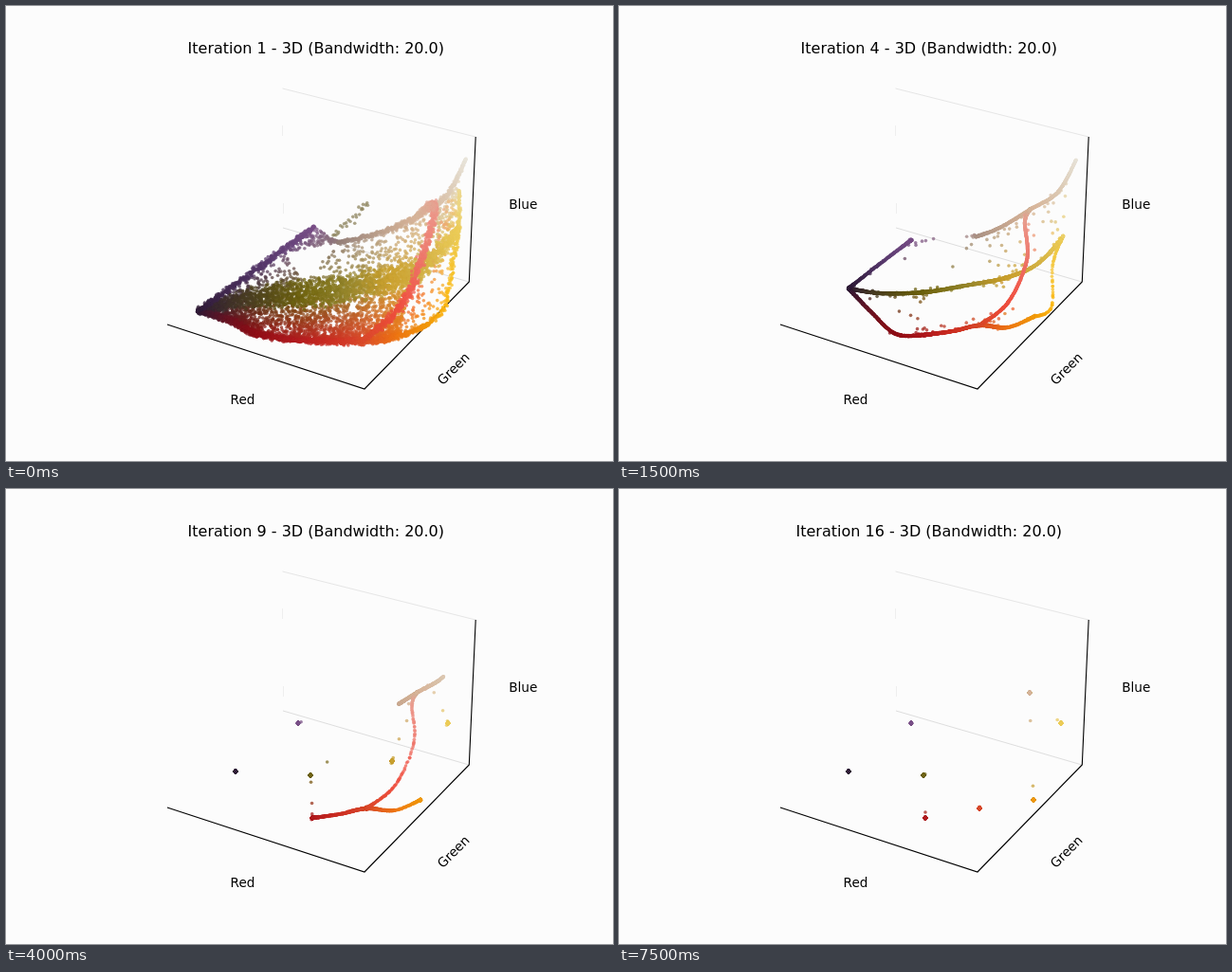
An HTML page with a canvas for the animation above (8000 ms loop, 640x480 px).

```html
<!DOCTYPE html>
<html>
<head>
<meta charset="utf-8">
<title>Mean shift in colour space</title>
<style>
html, body { margin: 0; width: 100%; height: 100%; overflow: hidden; background: #fcfcfc; }
canvas { display: block; }
</style>
</head>
<body>
<canvas id="stage" width="640" height="480"></canvas>
<script>
const ctx = document.getElementById('stage').getContext('2d');
const STEP = 500, STEPS = 16;

let seed = 1;
function rand() {
  seed = (seed * 1664525 + 1013904223) % 4294967296;
  return seed / 4294967296;
}
const mix = (a, b, t) => a + (b - a) * t;
const mixAll = (a, b, t) => a.map((v, i) => mix(v, b[i], t));
const clamp = v => Math.max(0, Math.min(1, v));

// A knot moves from its first place to its settled place; modes attract dots.
function knot(color, from, to = from, mode = false) {
  const n = parseInt(color.slice(1), 16);
  return { rgb: [n >> 16, n >> 8 & 255, n & 255], from, to, mode };
}
const mode = (color, from, to) => knot(color, from, to, true);

const dark = mode('#301c38', [202, 322], [242, 298]);
const purple = mode('#7a5088', [325, 233], [308, 247]);
const olive = mode('#706412', [315, 304], [321, 302]);
const gold = mode('#c8a030', [405, 288], [407, 287]);
const yellow = mode('#eccc58', [477, 236], [466, 247]);
const red = mode('#b01c20', [305, 353], [323, 347]);
const coral = mode('#d84a2a', [375, 354], [380, 337]);
const orange = mode('#f0980c', [445, 336], [437, 328]);
const tan = mode('#d6b49a', [433, 222], [433, 215]);
const goldStart = gold.to;

// Dots along a curve; "end" is the iteration by which all have reached a mode.
function strand(n, spread, end, ...knots) {
  const last = knots.length - 1;
  const modes = knots.flatMap((k, i) => k.mode ? [i / last] : []);
  return { n, spread, end, knots, modes };
}

const purpleArm = strand(420, 4, 5.3, purple, knot('#56386a', [268, 275], [275, 272]), dark);
const oliveBand = strand(1900, 17, 7.5, dark, knot('#4c4020', [262, 307], [275, 303]), olive,
  knot('#94842a', [362, 297], [365, 295]), gold, knot('#d2b044', [440, 276], [440, 273]), yellow);
const tanArm = strand(450, 3, 12, knot('#94807a', [350, 250], [355, 250]), knot('#bca08c', [395, 239], [397, 236]),
  tan, knot('#dcc8b2', [465, 199], [463, 196]), knot('#e8e4da', [485, 161], [484, 158]));
const darkRim = strand(500, 4, 5.5, dark, knot('#6a1422', [236, 332], [266, 323]),
  knot('#8e1018', [264, 346], [292, 346]), red);
const brightRim = strand(550, 4, 11, red, knot('#cc3024', [345, 354], [352, 343]), coral,
  knot('#ec7414', [412, 349], [410, 339]), orange);
const pinkArm = strand(700, 7, 9.5, coral, knot('#ee5040', [415, 318], [410, 313]),
  knot('#ee7468', [438, 268], [430, 268]), knot('#ea9a8c', [452, 212], [428, 228]), tan);
const column = strand(190, 4, 4.6, orange, knot('#fab410', [463, 316], [456, 318]),
  knot('#f4c434', [471, 270], [457, 275]), yellow, knot('#ecd890', [478, 195], [473, 238]));
const greys = strand(26, 5, 3, knot('#8f8560', [345, 242], tan.to), knot('#8f8560', [382, 209], tan.to));

const strands = [greys, column, tanArm, oliveBand, darkRim, brightRim, pinkArm, purpleArm];

// Dots strewn between stretches of two strands; they fall to the nearer one.
const sheets = [
  { n: 140, a: purpleArm, ua: [0, .35], b: tanArm, ub: [0, .1], bias: 1, speed: 3 },
  { n: 520, a: oliveBand, ua: [.3, 1], b: tanArm, ub: [0, .9], bias: 1.2, speed: 3 },
  { n: 300, a: purpleArm, ua: [.3, 1], b: oliveBand, ub: [.35, 0], bias: 1, speed: 20 },
  { n: 200, a: pinkArm, ua: [0, .8], b: column, ub: [0, 1], bias: 1, speed: 5 },
  { n: 1200, a: darkRim, ua: [0, 1], b: oliveBand, ub: [0, .35], bias: 2.2, speed: 20 },
  { n: 1600, a: brightRim, ua: [0, .75], b: oliveBand, ub: [.35, .8], bias: 2.2, speed: 20 }
];

// Between two modes dots gather at the nearer; free ends draw in.
function flow(u, modes, q) {
  if (!modes.length) return u;
  const m = modes.reduce((a, b) => Math.abs(b - u) < Math.abs(a - u) ? b : a);
  const d = u - m, next = modes[modes.indexOf(m) + Math.sign(d)];
  if (next === undefined) return m + d * (d < 0 ? 1 - q : 1 - q * q);
  const half = (next - m) / 2;
  return m + half * (d / half) ** (1 + .6 * q / (1 - q));
}

// Catmull-Rom through points, u in 0..1
function along(points, u) {
  const last = points.length - 1, i = Math.min(last - 1, Math.floor(u * last)), t = u * last - i;
  const [a, b, c, d] = [-1, 0, 1, 2].map(o => points[Math.max(0, Math.min(last, i + o))]);
  return b.map((v, k) => v + .5 * t * (c[k] - a[k] + t * (2 * a[k] - 5 * v + 4 * c[k] - d[k] +
    t * (3 * (v - c[k]) + d[k] - a[k]))));
}

// [x, y, r, g, b] of the dot that began at u
function place(s, u, it) {
  return along(s.points, flow(u, s.modes, clamp((it - 1) / (s.end - 1))));
}

function dot([x, y, ...rgb], spread) {
  const jitter = () => (rand() + rand() - 1) * spread;
  ctx.fillStyle = `rgb(${rgb.map(Math.round)})`;
  ctx.beginPath();
  ctx.arc(x + jitter() * .6, y + jitter(), 1.8, 0, 7);
  ctx.fill();
}

function drawStrand(s, it) {
  for (let i = 0; i < s.n; i++) {
    const u = clamp((i + rand()) / s.n);
    const lag = rand() ** (8 * (it - 1) ** 2);
    dot(place(s, u, it), .7 + s.spread * Math.sqrt(Math.sin(Math.PI * u)) * lag);
  }
}

function drawSheet({ n, a, ua, b, ub, bias, speed }, it) {
  const power = 1 + speed * (it - 1) ** 2;
  for (let i = 0; i < n; i++) {
    const t = rand(), c = rand() ** bias;
    const across = c < .5 ? .5 * (2 * c) ** power : 1 - .5 * (2 - 2 * c) ** power;
    dot(mixAll(place(a, mix(...ua, t), it), place(b, mix(...ub, t), it), across), .7);
  }
}

function line(color, width, ...pts) {
  ctx.strokeStyle = color;
  ctx.lineWidth = width;
  ctx.beginPath();
  for (const [x, y] of pts) ctx.lineTo(x, y);
  ctx.stroke();
}

function label(text, x, y, size, angle = 0) {
  ctx.save();
  ctx.translate(x, y);
  ctx.rotate(angle);
  ctx.font = size + 'px "DejaVu Sans", sans-serif';
  ctx.fillText(text, 0, 0);
  ctx.restore();
}

function draw(it) {
  seed = 7;
  ctx.fillStyle = '#fcfcfc';
  ctx.fillRect(0, 0, 640, 480);

  line('#e6e6e6', 1, [291.5, 87], [495, 138]);
  line('#dedede', 1, [292, 234], [488, 291]);
  line('#eeeeee', 1, [291.5, 126], [291.5, 137]);
  line('#eeeeee', 1, [292.5, 208], [292.5, 219]);
  line('#000', 1.1, [170, 336], [378, 404], [488.3, 291], [495.2, 138]);

  // the gold mode ends up in the orange one
  gold.to = mixAll(goldStart, orange.to, clamp((it - 9) / 7) ** 1.5);
  const settle = clamp((it - 1) / 2);
  for (const s of strands) s.points = s.knots.map(k => [...mixAll(k.from, k.to, settle), ...k.rgb]);

  ctx.globalAlpha = .75;
  for (const s of sheets) drawSheet(s, it);
  for (const s of strands) drawStrand(s, it);
  ctx.globalAlpha = 1;

  ctx.fillStyle = '#000';
  ctx.textAlign = 'center';
  label(`Iteration ${it} - 3D (Bandwidth: 20.0)`, 326.8, 50, 16);
  label('Red', 249.5, 420, 13.6);
  label('Blue', 545.2, 214, 13.6);
  label('Green', 475, 386, 13.6, -Math.PI / 4);
}

let shown = 0;
function tick() {
  const it = Math.floor(performance.now() / STEP) % STEPS + 1;
  if (it !== shown) draw(shown = it);
  requestAnimationFrame(tick);
}
tick();
</script>
</body>
</html>
```
